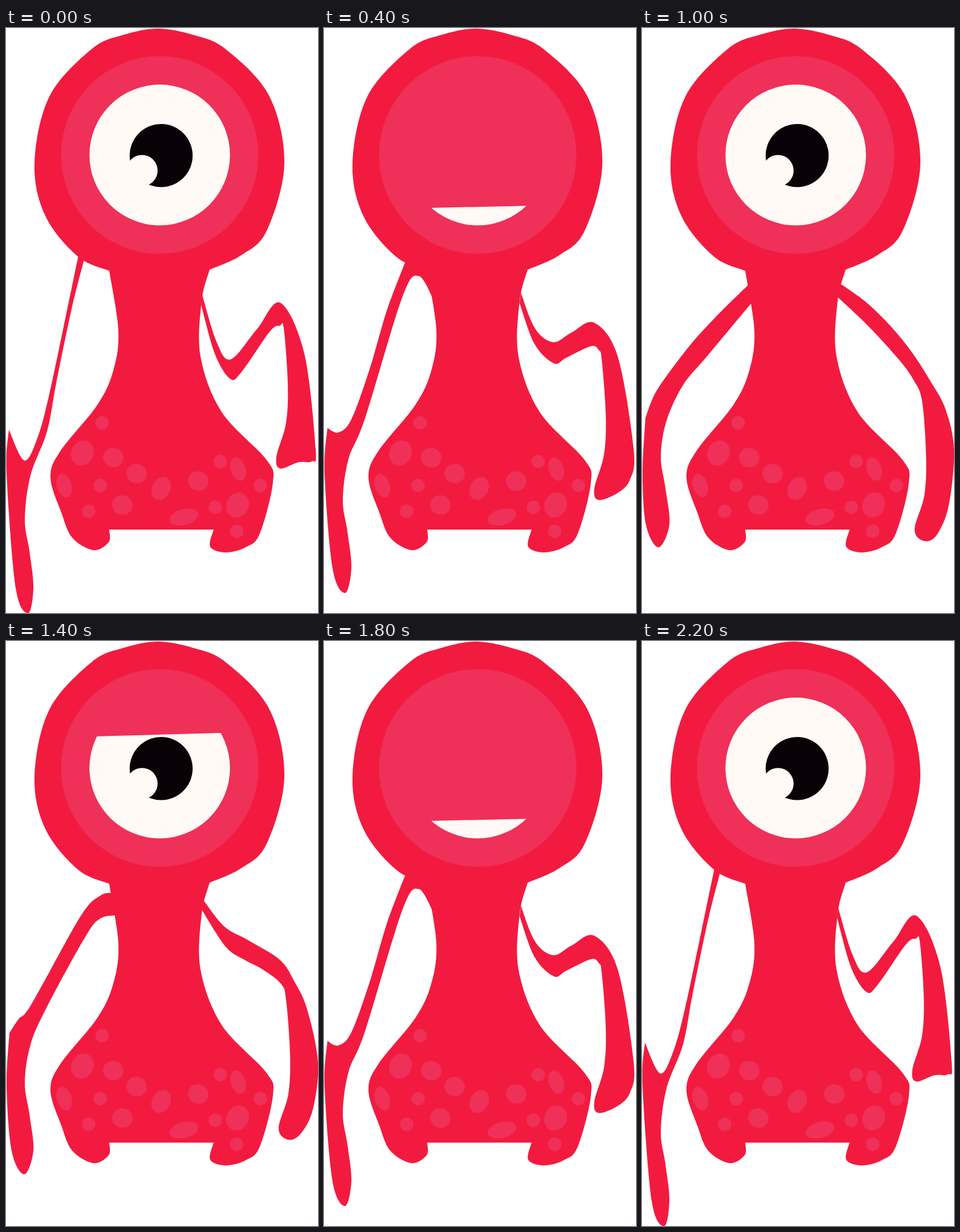
Animation, 547 px wide and 1024 px high, one loop 2400 ms. Source, as an HTML page:

```html
<!DOCTYPE html>
<html lang="en">
<head>
<meta charset="utf-8">
<title>One-eyed monster</title>
<style>
  html, body { margin: 0; width: 100%; height: 100%; overflow: hidden; background: #fff; }
  svg { display: block; width: 100%; height: 100%; }
</style>
</head>
<body>
<svg viewBox="0 0 547 1024">
  <defs><clipPath id="eyeClip"><circle cx="269.5" cy="222.3" r="125"/></clipPath></defs>
  <g fill="#f21b3f">
    <path id="leftArm"/>
    <path id="rightArm"/>
    <path id="body"/>
  </g>
  <g id="spots" fill="#ef3058"></g>
  <circle cx="269.5" cy="222.3" r="173" fill="#ef3058"/>
  <circle cx="269.5" cy="222.3" r="123.2" fill="#fffaf5"/>
  <circle cx="272" cy="223.3" r="55.2" fill="#080206"/>
  <circle cx="238.5" cy="249.5" r="27.3" fill="#fffaf5"/>
  <path id="lid" fill="#ef3058" clip-path="url(#eyeClip)"/>
</svg>
<script>
const STEP = 200;
const $ = id => document.getElementById(id);
const points = text => text.split(' ').map(pair => pair.split(',').map(Number));

// Smooth curve through a run of points
function curve(run) {
  let path = '';
  for (let i = 0; i < run.length - 1; i++) {
    const a = run[i], b = run[i + 1];
    const before = run[i - 1] || a, after = run[i + 2] || b;
    const c1 = a.map((v, k) => v + (b[k] - before[k]) / 6);
    const c2 = b.map((v, k) => v - (after[k] - a[k]) / 6);
    path += `C${c1} ${c2} ${b}`;
  }
  return path;
}
// Runs meet in corners
const outline = (...runs) =>
  `M${runs[0][0]}` + runs.map(run => `L${run[0]}` + curve(run)).join('') + 'Z';

const head = points('181,425 126,400 69,329 50,237 76,120 150,37 206,12 266,1 328,12 385,37 461,118 488,237 457,355 412,398 357,423');
const rightSide = points('357,423 343,478 341,575 378,672 456,755 468,795 445,885 420,909 385,918 358,908 364,878');
const leftSide = points('181,878 180,900 153,914 116,892 97,848 78,787 95,741 160,660 188,600 197,530 181,425');
$('body').setAttribute('d', outline(head, rightSide, leftSide));

const spot = (rx, ry, turn) => ([x, y]) =>
  `<ellipse rx="${rx}" ry="${ry}" transform="translate(${x} ${y}) rotate(${turn})"/>`;
$('spots').innerHTML = [
  ...points('168.5,691 165,801 145,846 375.5,759 446,801 367,839 404.5,881').map(spot(11.8, 11.8, 0)),
  ...points('188,752 229,780 204,835 337,793').map(spot(18, 17, 20)),
  ...points('102,801 407,772').map(spot(13, 21, -18)),
  ...points('134,744 406,835').map(spot(19.5, 22.5, 25)),
  spot(16, 21, 28)([272, 806]),
  spot(26, 14, -15)([312, 856])
].join('');

// lid: edge heights left and right; waist, elbow, lean: left arm; tip, wide: right hand
const resting = {
  lid: [90, 90], waist: 750, elbow: 625, lean: 0, tip: 898, wide: 4,
  leftOuter: points('188,448 130,505 82,558 32,625 16,655 6,683'),
  leftInner: points('112,577 153,528 194,479'),
  rightOuter: points('347,447 393,480 436,522 472,566 505,617 532,667'),
  rightInner: points('476,616 450,580 397,522 343,471')
};
const lowering = {
  lid: [167.3, 160.6], waist: 773, elbow: 640, lean: 3, tip: 873, wide: 4,
  leftOuter: points('187,441 165,446 130,483 45,635 22,662 6,686'),
  leftInner: points('139,518 165,486 194,480'),
  rightOuter: points('347,455 383,500 425,524 480,558 505,595 528,645'),
  rightInner: points('482,600 450,575 418,558 385,535 343,470')
};
const half = {
  lid: [233, 220], waist: 798, elbow: 660, lean: 5, tip: 846, wide: 0,
  leftOuter: points('163,419 136,446 105,508 45,655 25,679 8,688'),
  leftInner: points('135,505 172,462 194,484'),
  rightOuter: points('346,460 375,508 410,531 458,527 488,545 508,577'),
  rightInner: points('478,578 455,568 408,569 373,541 343,477')
};
const drowsy = {
  lid: [315.7, 310.4], waist: 826, elbow: 683, lean: 8, tip: 826, wide: 0,
  leftOuter: points('143,408 110,495 80,597 48,685 25,708 6,700'),
  leftInner: points('137,472 166,434 194,480'),
  rightOuter: points('345,463 370,526 402,550 434,533 474,516 515,575'),
  rightInner: points('482,564 468,557 425,577 403,587 369,553 343,482')
};
const raised = {
  lid: [90, 90], waist: 860, elbow: 706, lean: 10, tip: 771, wide: 0,
  leftOuter: points('127,398 102,518 75,645 55,718 32,757 5,703'),
  leftInner: points('88,622 115,492 137,405'),
  rightOuter: points('344,467 369,549 394,580 440,527 481,481 523,570'),
  rightInner: points('480,521 462,532 413,602 393,614 366,570 342,484')
};

const midway = (a, b) => Array.isArray(a) ? a.map((v, i) => midway(v, b[i])) : (a + b) / 2;
const closed = Object.fromEntries(
  Object.keys(drowsy).map(key => [key, midway(drowsy[key], raised[key])]));
Object.assign(closed, { lid: [350, 350], waist: 824 });

function leftArm({ leftOuter, leftInner, waist, elbow, lean }) {
  const hand = [
    leftOuter.at(-1), [1, 780], [7 + lean, waist + 120], [29 + lean, waist + 159 + lean / 2],
    [48, waist + 119], [41, waist + 55], [33, waist], [43, (waist + elbow) / 2], [72, elbow]
  ];
  return outline(leftOuter, [...hand, ...leftInner], [[190, 420]]);
}

function rightArm({ rightOuter, rightInner, tip, wide }) {
  const hand = [
    [543 + wide, 738], [536 + wide / 2, 740 + 0.6 * (tip - 740)], [513 + wide, tip - 11],
    [481 + 3.5 * wide, tip], [474 + wide, tip - 20], [491 + wide, tip - 80],
    [494 + wide, tip - 150], [487 + wide, tip - 245]
  ];
  return outline([...rightOuter, ...hand, ...rightInner]);
}

function show(pose) {
  const [left, right] = pose.lid;
  $('leftArm').setAttribute('d', leftArm(pose));
  $('rightArm').setAttribute('d', rightArm(pose));
  $('lid').setAttribute('d', `M140 90V${left}H147L392 ${right}H400V90Z`);
}

const swing = [raised, closed, drowsy, half, lowering, resting];
const cycle = [...swing, ...swing.slice().reverse()];
const start = performance.now();
function tick() {
  const elapsed = performance.now() - start;
  show(cycle[Math.floor(elapsed / STEP) % cycle.length]);
  requestAnimationFrame(tick);
}
tick();
</script>
</body>
</html>
```
